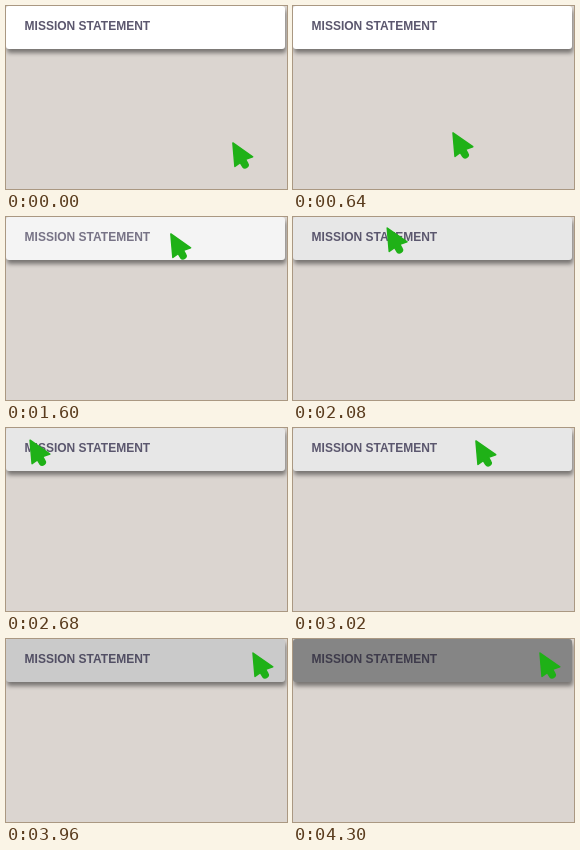
Recreate the animation shown at these times as an HTML page. Size 281 by 183 pixels, loop 5200 ms.

```html
<!DOCTYPE html>
<html lang="en">
<head>
<meta charset="utf-8">
<title>Hover and press</title>
<style>
html, body { margin: 0; width: 100%; height: 100%; overflow: hidden; background: #dbd5d0; }
#card {
  position: absolute; left: 0; top: 0; width: 278.5px; height: 43px;
  border-radius: 3px; box-shadow: 1px 4px 4px rgba(0, 0, 0, .45);
  font: bold 12px/41px Arial, "Liberation Sans", sans-serif;
  text-indent: 18.6px; white-space: nowrap;
}
#cursor { position: absolute; left: 0; top: 0; overflow: visible; }
</style>
</head>
<body>
<div id="card">MISSION STATEMENT</div>
<svg id="cursor" width="24" height="28">
  <path d="M1 1 L3 24.5 L8.3 20.6 L10.8 24.7 Q12.6 27 15 25.2 Q17.2 23.6 15.8 21.4 L13.6 17.4 L20.8 14.8 Z"
    fill="#1fb117" stroke="#1fb117" stroke-width="1.5" stroke-linejoin="round"/>
</svg>
<script>
const LOOP = 5200;
const card = document.getElementById('card');
const cursor = document.getElementById('cursor');

function draw() {
  const t = performance.now() % LOOP;
  // Progress from 0 to 1 between two times; a higher power slows the end more.
  const ramp = (start, end, power = 1) =>
    1 - (1 - Math.min(1, Math.max(0, (t - start) / (end - start)))) ** power;

  const approach = ramp(0, 640), rise = ramp(640, 1600);
  const left = ramp(1600, 2700, 1.2), right = ramp(2700, 3540, 2.6);
  const x = 226 - 67 * approach + 5 * rise - 142 * left + 224 * right;
  const y = 136 - 10 * approach - 110 * rise - 6 * ramp(1600, 2080) + 3 * ramp(2080, 3540);
  cursor.style.transform = `translate(${x}px, ${y}px)`;

  const hover = ramp(1390, 1850), press = ramp(3820, 4300);
  const gray = 255 - 24 * hover - 98 * press;
  const shade = 1 - 0.32 * press;
  const alpha = 1 - 0.18 * Math.sin(Math.PI * hover);
  card.style.background = `rgb(${gray}, ${gray}, ${gray})`;
  card.style.color = `rgba(${91 * shade}, ${87 * shade}, ${110 * shade}, ${alpha})`;
  requestAnimationFrame(draw);
}
draw();
</script>
</body>
</html>
```
